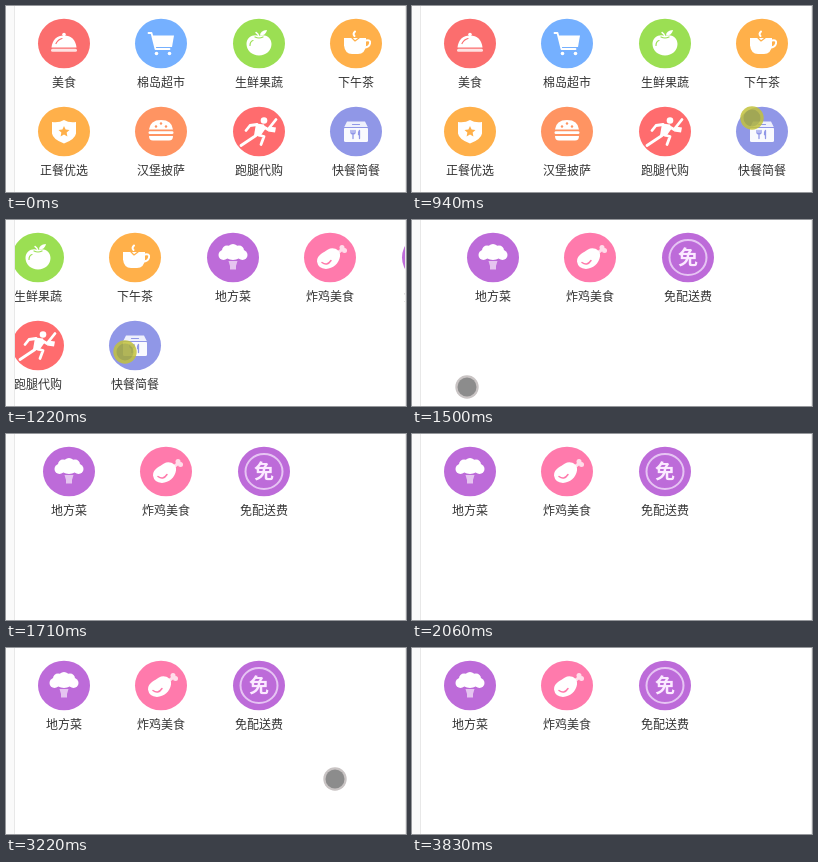
Animation of 400 by 186 pixels, one loop 5480 ms. Source, as an HTML page:

```html
<!DOCTYPE html>
<html lang="zh-CN">
<head>
<meta charset="utf-8">
<title>分类滑动</title>
<style>
  html, body { margin: 0; width: 100%; height: 100%; overflow: hidden; background: #fff; }
  svg { display: block; width: 400px; height: 186px; }
  text { font: 12px "Noto Sans CJK SC", "Noto Sans CJK", sans-serif; text-anchor: middle; fill: #333; }
  .icon { fill: #fff; stroke-linecap: round; stroke-linejoin: round; }
  .icon .cut { fill: currentColor; }
  .icon .line { fill: none; stroke: #fff; }
  .icon .groove { fill: none; stroke: currentColor; }
  .icon text { font-size: 20px; font-weight: 700; fill: #fbeaff; }
</style>
</head>
<body>
<svg viewBox="0 0 400 186">
  <defs><clipPath id="view"><rect x="9" width="390" height="186"/></clipPath></defs>
  <rect width="8" height="186" fill="#fafafa"/>
  <path d="M8.5 0V186M399.5 0V186" stroke="#e8e8e8"/>
  <g clip-path="url(#view)"><g id="track"></g></g>
  <g id="cursor">
    <g id="idle">
      <circle r="11.7" fill="#c9c4c4"/>
      <circle r="9.5" fill="#8c8c8c"/>
    </g>
    <g id="pressed" opacity=".85">
      <circle r="11.7" fill="#c2c23c"/>
      <circle r="8.5" fill="#a5aa3c"/>
    </g>
  </g>
</svg>
<script>
const LOOP = 5480, PAGE = 390, TICK = 70;
const PRESS = 880, DRAG = 940, RELEASE = 1220;
const DRAG_X = 340;

const icons = {
  cloche: `<circle cy="-9" r="1.8"/><path d="M-12.5 4Q-11-8 0-8T12.5 4z"/>
    <rect x="-13" y="5.3" width="26" height="3" rx="1.5" opacity=".8"/>
    <path class="groove" d="M-8 0q2-4 6-5" stroke-width="1.2"/>`,
  cart: `<path class="line" d="M-12.5-10.5h3l4 16h14" stroke-width="1.8"/>
    <path d="M-9-8H13L11 3.500H-6z"/><circle cx="-4.500" cy="10" r="1.800"/><circle cx="8.500" cy="10" r="1.800"/>`,
  apple: `<path d="M0-7.5C5-10 12.500-7 12.500 0.500C12.500 7 7 12 0 12S-12.500 7-12.500 0.500C-12.500-7-5-10 0-7.5z"/>
    <path d="M1-8q0-5 7-5.500q-1 5.500-7 5.500z"/><path class="line" d="M0-7q-1-3-3-4" stroke-width="1.4"/>
    <path class="groove" d="M-4-6.500q4 2 8 0M-9 2q0-4 3-5" stroke-width="1.2"/>`,
  cup: `<path d="M-12-5.500H10V2Q9 10.500 2 10.500H-4Q-11 10.500-12 2z"/>
    <path class="line" d="M10-3q5-1 4 3t-6 4M-1.500-7.500q-2-2 .5-4.500" stroke-width="2"/>
    <path class="groove" d="M-4-5.500l3 3l4-3" stroke-width="1.2"/>`,
  shield: `<path d="M0-11.500Q5-8.500 12-9.500V2Q11 8 0 12Q-11 8-12 2V-9.500Q-5-8.500 0-11.500z"/>
    <path class="cut" transform="scale(.85)" d="M0-6.500l1.900 4.200 4.600.5-3.400 3.100.9 4.500L0 3.500l-4 2.300.9-4.500-3.400-3.100 4.600-.5z"/>`,
  burger: `<path d="M-12-2Q-11-11.500 0-11.500T12-2z"/><rect x="-12.500" y="-.2" width="25" height="2.800" rx="1.400"/>
    <path d="M-12 4.500H12Q12 9 8 9H-8Q-12 9-12 4.500z"/>
    <g class="cut"><circle cx="-5" cy="-5" r="1.200"/><circle cy="-8" r="1.200"/><circle cx="5" cy="-5" r="1.200"/></g>`,
  runner: `<circle cx="5" cy="-11" r="3.300"/><path d="M-3-8L5-7L6-2L1 5L-5 4z"/>
    <path class="line" d="M-2-7l-7 1l-4 5M4-5l5 3l8-10M-2 3l7 2l-3 8M-3 4l-6 4l-9 6" stroke-width="2.800"/>
    <path d="M10-5l7 1l-1 5l-7-1z"/>`,
  lunchbox: `<path d="M-9-10H9L12-4H-12z" opacity=".85"/>
    <rect x="-12" y="-4" width="24" height="14.500" rx="1.500" opacity=".95"/>
    <path class="groove" d="M-3.500-7h7M-12-4H12" stroke-width="1.200"/>
    <path class="groove" d="M-5-1v2.500q2 2 4 0V-1M-3-1v8M3.500 7V-1q-1.500 2-1 4" stroke-width="1.300"/>`,
  broccoli: `<path d="M-4.500 3.500h9l-1.500 5v3.500h-6v-3.500z" opacity=".6"/>
    <circle cx="-9.500" cy="-2.500" r="5"/><circle cx="-6" cy="-7" r="5"/><circle cy="-8" r="5.500"/>
    <circle cx="6" cy="-7" r="5"/><circle cx="9.500" cy="-2.500" r="5"/><ellipse cy="-2.500" rx="8" ry="5"/>`,
  drumstick: `<g opacity=".75"><path class="line" d="M7-4l5-4" stroke-width="3"/>
    <circle cx="12" cy="-10" r="2.500"/><circle cx="14.500" cy="-7" r="2.500"/></g>
    <path d="M-13 4C-13-3-6-5-2-8C3-11 11-8 10-1C9 6 3 11-4 11.500Q-12 11-13 4z"/>
    <path class="groove" d="M-8 5q5 4 9-2" stroke-width="1.500"/>`,
  free: `<ellipse rx="18.500" ry="17.500" fill="none" stroke="#e6c4f3" stroke-width="2"/><text y="7">免</text>`
};

// label, circle colour, icon, column, row
const items = [
  ["美食", "#fb6e6e", "cloche", 0, 0],
  ["棉岛超市", "#75b0ff", "cart", 1, 0],
  ["生鲜果蔬", "#9bdf53", "apple", 2, 0],
  ["下午茶", "#ffb04a", "cup", 3, 0],
  ["正餐优选", "#ffb04a", "shield", 0, 1],
  ["汉堡披萨", "#ff9462", "burger", 1, 1],
  ["跑腿代购", "#ff6c6e", "runner", 2, 1],
  ["快餐简餐", "#9097e7", "lunchbox", 3, 1],
  ["地方菜", "#bd6bd9", "broccoli", 4, 0],
  ["炸鸡美食", "#ff7aac", "drumstick", 5, 0],
  ["免配送费", "#bd6bd9", "free", 6, 0]
];

const $ = id => document.getElementById(id);
const track = $("track"), cursor = $("cursor"), idle = $("idle"), pressed = $("pressed");

track.innerHTML = items.map(([label, color, icon, col, row]) => `
  <g transform="translate(${Math.round(57.75 + col * 97.5)} ${37.5 + row * 88})">
    <ellipse rx="26" ry="24.8" fill="${color}"/>
    <g class="icon" style="color:${color}">${icons[icon]}</g>
    <text y="43.5">${label}</text>
  </g>`).join("");

const easeIn = p => p ** 1.5;
const easeOut = p => 1 - (1 - p) ** 2;
const linear = p => p;

// start, end, steps, from, to, easing
const moves = [
  [400, 610, 3, [351, 156], [342, 112], easeOut],
  [PRESS, DRAG, 1, [342, 112], [DRAG_X, 112], linear],
  [DRAG, RELEASE, 4, [DRAG_X, 112], [119, 132], easeIn],
  [RELEASE, 1500, 4, [119, 132], [55, 167], easeOut],
  [1500, 1640, 2, [55, 167], [51, 200], linear],
  [2880, 3220, 5, [305, 167], [329, 131], easeOut],
  [3350, 3830, 7, [329, 131], [354, 200], easeIn]
];

function cursorAt(t) {
  const move = moves.filter(m => m[0] <= t).pop();
  if (!move) return [0, 300];
  const [start, end, steps, from, to, ease] = move;
  const step = Math.floor((t - start + 1) / (end - start) * steps);
  const p = ease(Math.min(1, step / steps));
  return from.map((v, i) => Math.round(v + (to[i] - v) * p));
}

// The track follows the cursor, then glides to the second page.
function shiftAt(t, x) {
  if (t < DRAG) return 0;
  if (t < RELEASE) return DRAG_X - x;
  const elapsed = Math.floor((t - RELEASE) / TICK) * TICK;
  return PAGE - Math.round(169 * Math.exp(-elapsed / 140));
}

function draw(t) {
  const [x, y] = cursorAt(t);
  const down = t >= PRESS && t < RELEASE + TICK;
  track.setAttribute("transform", `translate(${-shiftAt(t, x)} 0)`);
  cursor.setAttribute("transform", `translate(${x} ${y})`);
  idle.style.display = down ? "none" : "";
  pressed.style.display = down ? "" : "none";
}

const origin = performance.now();
function frame() {
  draw((performance.now() - origin) % LOOP);
  requestAnimationFrame(frame);
}
frame();
</script>
</body>
</html>
```
